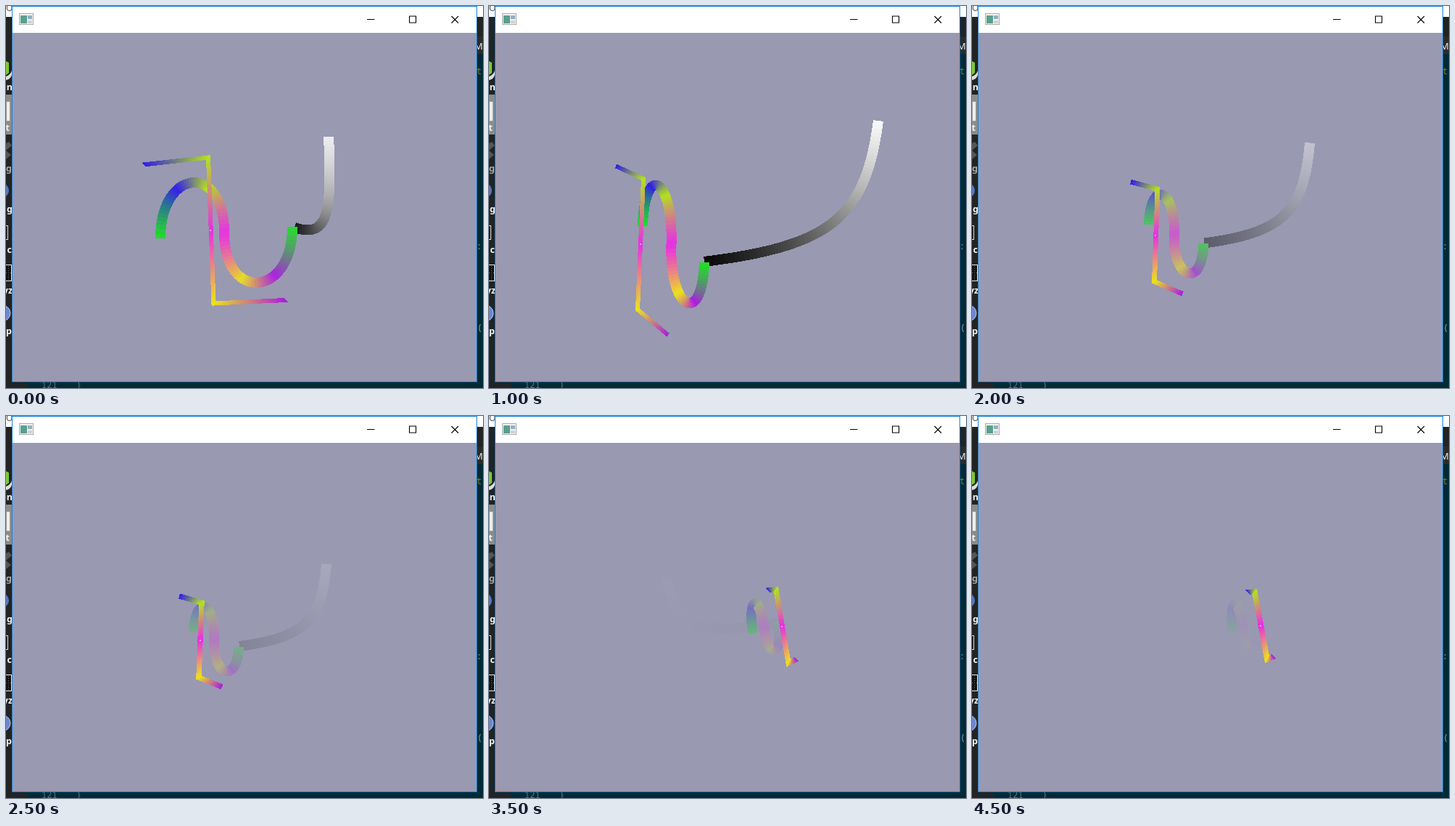
Animation of 658 by 526 pixels, one loop 5 s. Source, as an HTML page:

```html
<!DOCTYPE html>
<html lang="en">
<head>
<meta charset="utf-8">
<title>Ribbons</title>
<style>
  html, body { margin: 0; width: 100%; height: 100%; overflow: hidden; background: #222; }
  svg { display: block; width: 658px; height: 526px; }
  .label { font: bold 12.5px "Noto Sans", sans-serif; fill: #f4f4f4; text-anchor: end; }
  .code { font: 12px "Noto Sans Mono", monospace; fill: #5f757b; }
</style>
</head>
<body>
<svg viewBox="0 0 658 526">
  <g shape-rendering="crispEdges">
    <rect width="658" height="526" fill="#222324"/>
    <rect width="658" height="15" fill="#fff"/>
    <rect x="649" y="66" width="9" height="460" fill="#002b36"/>
    <rect x="649" y="42" width="9" height="24" fill="#2b2b2b"/>
    <rect x="30" y="517" width="628" height="9" fill="#002b36"/>
    <rect y="122" width="9" height="55" fill="#8b8b8b"/>
    <rect y="131" width="5" height="27" fill="#eee" stroke="#999"/>
    <rect x="-4" y="302" width="6" height="19" fill="#222" stroke="#ddd"/>
    <rect x="-4" y="356" width="11" height="22" fill="#111" stroke="#eee"/>
    <path d="M0 367H7M3.5 358V377" stroke="#777" stroke-dasharray="1 2"/>
  </g>
  <path d="M0 76L4 78V92L0 95Z" fill="#7cc832"/>
  <path d="M0 97Q6 95 8 89V95Q6 101 0 102Z" fill="#ddd"/>
  <path d="M0 189L4 187L8 192L0 199ZM0 199L7 205L0 211Z" fill="#555"/>
  <circle cx="-6" cy="254" r="10" fill="#5676bd"/>
  <circle cx="-5" cy="423" r="11" fill="#6c87d2" stroke="#bcc8ea"/>
  <text x="0" y="7" font-family="Noto Sans, sans-serif" font-size="12" fill="#555">O</text>
  <g class="label">
    <text x="9" y="116">on</text><text x="5" y="172">t</text>
    <text x="8" y="228" fill="#aaa">g</text><text x="9" y="284">ug</text>
    <text x="8" y="340">c</text><text x="9" y="396">yz</text><text x="8" y="452">p</text>
  </g>
  <text x="646" y="60" font-family="Noto Sans, sans-serif" font-size="13" fill="#eee">Ma</text>
  <g class="code">
    <text x="649" y="94" fill="#7d7d20">t</text>
    <text x="649" y="335" fill="#93a1a1">:</text>
    <text x="650" y="447" fill="#93a1a1">(</text>
    <text x="49" y="526">121</text><text x="97" y="526">}</text>
  </g>

  <g shape-rendering="crispEdges">
    <rect x="8" y="0" width="642" height="518" fill="#1883d7"/>
    <rect x="9" y="1" width="640" height="36" fill="#fff"/>
    <rect x="9" y="37" width="640" height="480" fill="#9999b2"/>
    <rect x="18.5" y="10.5" width="19" height="15" fill="#f3f3f3" stroke="#aaa"/>
    <rect x="20" y="13" width="9" height="11" fill="#58a08e"/>
    <rect x="30" y="13" width="6" height="5" fill="#8fb0c4"/>
    <rect x="30" y="20" width="6" height="4" fill="#d2d2d2"/>
  </g>
  <path d="M498 18.5H508.5M556.5 14H565.5V23H556.5ZM614.5 14L624 23.5M624 14L614.5 23.5"
        fill="none" stroke="#000" stroke-width="1.1"/>
  <g id="scene" shape-rendering="crispEdges"></g>
</svg>

<script>
const STEP = 500, STEPS = 10;
const BACK = [153, 153, 178];
const GREEN = [30, 226, 35], BLUE = [48, 28, 232], LIME = [180, 226, 28],
      PINK = [232, 46, 228], YELLOW = [236, 226, 28], PURPLE = [172, 26, 226];
const SNAKE = [GREEN, BLUE, LIME, PINK, YELLOW, PURPLE, GREEN];
const ZIGZAG = [BLUE, LIME, PINK, YELLOW, PURPLE];
const GRAY = [[8, 8, 8], [250, 250, 250]];

// zig: corners; wave: start, end, handle; arc: dark end, bend, light end; fog: visibility at both ends
const poses = [
  { zig: [190, 218.5, 279, 208.5, 286.5, 409.5, 386, 405], wave: [213, 320, 395, 304, 0, -97],
    arc: [398, 305, 452, 322, 445, 180], fog: [.97, .92] },
  { zig: [178, 218, 250, 215, 237.5, 414, 319, 425], wave: [203, 314, 354, 320, 5, -96],
    arc: [354, 320, 480, 322, 491, 174], fog: [.98, .95] },
  { zig: [175, 220.5, 213, 238, 205, 418, 247, 453], wave: [212, 303, 297, 353, 3, -90],
    arc: [297, 352, 515, 325, 537, 158], fog: [1, 1] },
  { zig: [199, 236.5, 242, 247, 237, 399, 283, 420], wave: [229, 305, 318, 336, 2, -75],
    arc: [319, 336, 477, 315, 490, 173], fog: [.86, .86] },
  { zig: [239, 248, 270, 257, 266, 360, 298, 373], wave: [259, 297, 321, 318, 2, -51],
    arc: [322, 317, 434, 302, 442, 204], fog: [.3, .3] },
  { zig: [384, 240, 396, 239, 413, 340, 424, 335], wave: [364, 299, 400, 281, -7, -48],
    arc: [398, 285, 260, 308, 245, 222], fog: [.4, .1] },
  { zig: [380, 243, 390, 242, 407, 335, 416, 331], wave: [360, 298, 392, 279, -6, -45],
    fog: [.13, 0] }
];
poses[6].arc = poses[5].arc;

const lerp = (a, b, t) => a + (b - a) * t;
const mix = (a, b, t) => a.map((v, i) => lerp(v, b[i], t));
const add = (p, q, k = 1) => [p[0] + q[0] * k, p[1] + q[1] * k];
const pairs = list => list.reduce((out, v, i) => (i % 2 ? out[out.length - 1].push(v) : out.push([v]), out), []);

function ramp(colors, t) {
  const x = t * (colors.length - 1), i = Math.min(Math.floor(x), colors.length - 2);
  return mix(colors[i], colors[i + 1], x - i);
}

function bezier(a, b, c, d, n) {
  return Array.from({ length: n + 1 }, (_, i) => {
    const t = i / n, ab = mix(a, b, t), bc = mix(b, c, t), cd = mix(c, d, t);
    return mix(mix(ab, bc, t), mix(bc, cd, t), t);
  });
}

function normal(p, q) {
  const dx = q[0] - p[0], dy = q[1] - p[1], len = Math.hypot(dx, dy) || 1;
  return [-dy / len, dx / len];
}

// Mitred offset at vertex i; open ends may be cut on the diagonal.
function offset(pts, i, half, slant) {
  const last = pts.length - 1;
  const a = normal(pts[Math.max(i - 1, 0)], pts[Math.max(i, 1)]);
  const b = normal(pts[Math.min(i, last - 1)], pts[Math.min(i + 1, last)]);
  if (i === 0 || i === last) {
    const s = (a[0] + a[1]) * Math.SQRT1_2;
    if (!slant || Math.abs(s) < .55) return [a[0] * half, a[1] * half];
    return [Math.SQRT1_2 * half / s, Math.SQRT1_2 * half / s];
  }
  const k = half / Math.max(1 + a[0] * b[0] + a[1] * b[1], .3);
  return [(a[0] + b[0]) * k, (a[1] + b[1]) * k];
}

function ribbon(pts, colors, width, fog, cuts = 1, slant = false) {
  const sides = pts.map((p, i) => {
    const o = offset(pts, i, width / 2, slant);
    return [add(p, o), add(p, o, -1)];
  });
  const total = (pts.length - 1) * cuts;
  let out = "";
  for (let k = 0; k < total; k++) {
    const i = Math.floor(k / cuts), [l0, r0] = sides[i], [l1, r1] = sides[i + 1];
    const u = k % cuts / cuts, v = u + 1 / cuts, t = (k + .5) / total;
    const quad = [mix(l0, l1, u), mix(l0, l1, v), mix(r0, r1, v), mix(r0, r1, u)];
    const color = mix(BACK, ramp(colors, t), lerp(fog[0], fog[1], t)).map(Math.round);
    out += `<polygon points="${quad.map(p => p.map(c => c.toFixed(2))).join(" ")}" fill="rgb(${color})"/>`;
  }
  return out;
}

function poseAt(step) {
  const x = step < 3 ? step : 3 + (step - 3) / 2;
  const a = poses[Math.floor(x)], b = poses[Math.ceil(x)], pose = {};
  for (const key in a) pose[key] = mix(a[key], b[key], x % 1);
  return pose;
}

function draw(step) {
  const { zig, wave, arc, fog } = poseAt(step);

  const [dark, bend, light] = pairs(arc);
  const haze = fog[1] ** 1.6;
  const tail = bezier(dark, mix(dark, bend, .8), mix(light, bend, .8), light, 70);

  const [start, end, up] = pairs(wave);
  const mid = add(mix(start, end, .5), [-3, 0]);
  const snake = [
    ...bezier(start, add(start, up), add(mid, up), mid, 45),
    ...bezier(mid, add(mid, up, -1), add(end, up, -1), end, 45).slice(1)
  ];

  const [a, b, c, d] = pairs(zig), m = mix(b, c, .5);
  const width = 6 + 2 * (1 - fog[0]);

  document.getElementById("scene").innerHTML =
    (haze > 0 ? ribbon(tail, GRAY, 14, [haze, haze]) : "") +
    ribbon(snake, SNAKE, 14, fog) +
    ribbon([a, b, m, c, d], ZIGZAG, width, [1, 1], 30, true) +
    `<rect x="${m[0] - 1.5}" y="${m[1] - 1}" width="2" height="2" fill="#ee9be6"/>`;
}

let shown = -1;
function tick() {
  const step = Math.floor(performance.now() / STEP) % STEPS;
  if (step !== shown) draw(shown = step);
  requestAnimationFrame(tick);
}
tick();
</script>
</body>
</html>
```
